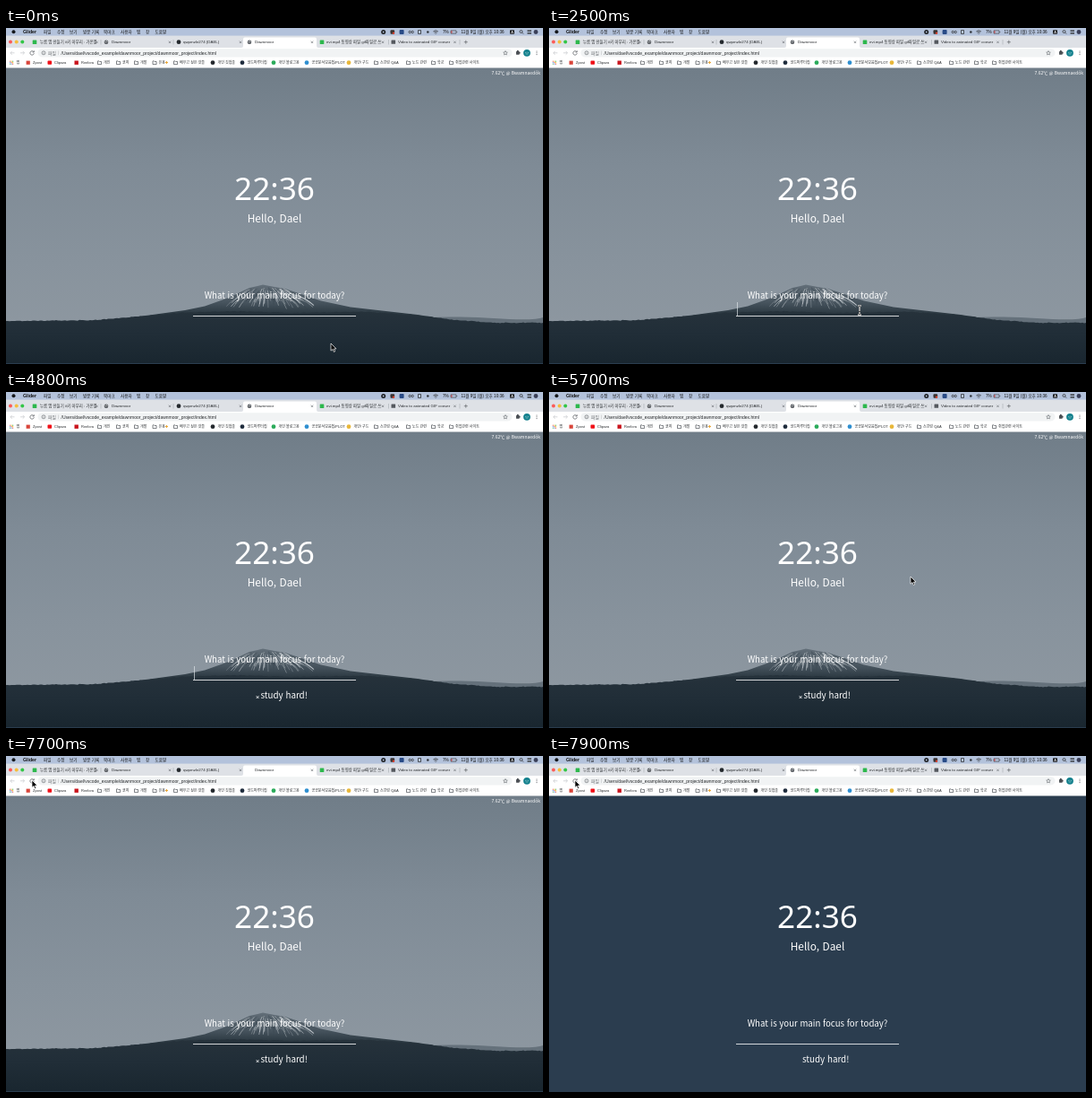
An HTML page that plays this animation: 600x375 px, repeating every 8 s.

```html
<!DOCTYPE html>
<html lang="ko">
<head>
<meta charset="utf-8">
<title>Dawnmoor</title>
<style>
html, body { margin: 0; width: 100%; height: 100%; overflow: hidden; background: #2b3d4f; }
#stage { position: relative; width: 600px; height: 375px; overflow: hidden; }
svg { position: absolute; left: 0; top: 0; }
text { white-space: pre; }
#bars { font-family: "Liberation Sans", "Noto Sans CJK KR", "Noto Sans CJK JP", sans-serif; fill: #25282b; }
#page { font-family: "Noto Sans CJK KR", "Noto Sans CJK JP", "Noto Sans", sans-serif; fill: #fff; }
#clock { font-family: "Noto Sans", sans-serif; }
.mid { text-anchor: middle; }

.scenery, #favicon, #todo, #cross, #todoText, #arrow, #beam {
  animation: 8s step-end infinite;
}
.scenery, #cross { animation-name: unload; }
#favicon { animation-name: favicon; }
#todo { animation-name: todo; }
#todoText { animation-name: nudge; }
#arrow { animation-name: arrow; }
#beam { animation-name: beam; }
#cursor { animation: move 8s linear infinite; }
#typed {
  position: absolute; left: 209.5px; top: 306px; height: 15px; width: 0;
  overflow: hidden; white-space: pre; color: #fff;
  font: 13px/15px "Liberation Sans", Arial, sans-serif;
  border-right: 1px solid transparent;
  animation: typing 8s step-end infinite, caret 8s step-end infinite;
}

@keyframes unload { 0% { opacity: 1 } 97.5%, 100% { opacity: 0 } }
@keyframes favicon { 0% { opacity: 1 } 96.25% { opacity: 0 } 97.5%, 100% { opacity: 1 } }
@keyframes todo { 0% { opacity: 0 } 60%, 100% { opacity: 1 } }
@keyframes nudge { 0% { transform: none } 97.5%, 100% { transform: translateX(-1.5px) } }
@keyframes arrow { 0% { opacity: 1 } 13.75% { opacity: 0 } 65%, 100% { opacity: 1 } }
@keyframes beam {
  0% { opacity: 0 } 13.75% { opacity: 1 } 33.75% { opacity: 0 }
  62.5% { opacity: 1 } 65%, 100% { opacity: 0 }
}
@keyframes typing {
  0% { width: 0 }
  33.75% { width: .5em }
  35% { width: .778em }
  37.5% { width: 1.334em }
  38.75% { width: 1.89em }
  41.25% { width: 2.39em }
  42.5% { width: 2.668em }
  46.25% { width: 3.224em }
  47.5% { width: 3.78em }
  50% { width: 4.113em }
  56.25% { width: 4.947em }
  60%, 100% { width: 0 }
}
@keyframes caret {
  0% { border-color: transparent }
  18.75% { border-color: #dde3e8b0 }
  25% { border-color: transparent }
  31.25% { border-color: #dde3e8b0 }
  66.25% { border-color: transparent }
  72.5% { border-color: #dde3e8b0 }
  78.75%, 100% { border-color: transparent }
}
@keyframes move {
  0% { transform: translate(363px, 352px) }
  5% { transform: translate(363px, 352px); animation-timing-function: steps(9, start) }
  16.25% { transform: translate(334px, 321px); animation-timing-function: step-end }
  17.5% { transform: translate(340px, 327px); animation-timing-function: step-end }
  18.75% { transform: translate(346px, 320px); animation-timing-function: step-end }
  20% { transform: translate(347px, 315px) }
  62.5% { transform: translate(347px, 315px); animation-timing-function: steps(8, start) }
  72.5% { transform: translate(404px, 206px); animation-timing-function: steps(5, start) }
  78.75% { transform: translate(408px, 196px) }
  83.75% { transform: translate(408px, 196px); animation-timing-function: ease-in-out }
  93.75%, 100% { transform: translate(29px, 27px) }
}
</style>
</head>
<body>
<div id="stage">
<svg width="600" height="375" viewBox="0 0 600 375">
  <defs>
    <linearGradient id="sky" x2="0" y2="1">
      <stop stop-color="#707d88"/><stop offset=".38" stop-color="#7f8b96"/>
      <stop offset=".75" stop-color="#88939d"/><stop offset="1" stop-color="#8d97a0"/>
    </linearGradient>
    <linearGradient id="rock" x2="0" y2="1">
      <stop stop-color="#626e78"/><stop offset=".5" stop-color="#46535d"/><stop offset=".8" stop-color="#2b3841"/>
    </linearGradient>
    <linearGradient id="land" x2="0" y2="1">
      <stop stop-color="#26323b"/><stop offset=".4" stop-color="#212e38"/><stop offset="1" stop-color="#19262f"/>
    </linearGradient>
  </defs>
  <g class="scenery">
    <rect y="44" width="600" height="290" fill="url(#sky)"/>
    <path d="M440 334V324Q500 321 545 324T600 323V334Z" fill="#65717b"/>
    <path d="M105 327L160 320.500L200 315L222 310.500L250 300.500L272 290L281 288L287 286.500L300 289L312 291L330 297L352 304.500L385 311.500L420 315.500L460 320L500 326.500Z" fill="url(#rock)"/>
    <g id="snow" fill="none" stroke-width=".7"></g>
    <path id="ridge" fill="url(#land)"/>
    <rect y="374" width="600" height="1" fill="#2b3d4f"/>
  </g>

  <g id="page">
    <text class="scenery" x="597" y="52" font-size="5" text-anchor="end">7.62℃ @ Bwamnaedŏk</text>
    <text id="clock" class="mid" x="300" y="192.300" font-size="35.200">22:36</text>
    <text class="mid" x="300" y="217" font-size="11.900">Hello, Dael</text>
    <text class="mid" x="300" y="301.500" font-size="9.650">What is your main focus for today?</text>
    <rect x="209" y="321" width="182" height="1" opacity=".8"/>
    <g id="todo">
      <path id="cross" d="M279.700 339.200l2.800 2.800m0-2.800l-2.800 2.800" stroke="#fff" stroke-width=".9"/>
      <text id="todoText" x="284.500" y="342" font-size="9.800">study hard!</text>
    </g>
  </g>

  <g id="bars"></g>
</svg>
<div id="typed">study hard!</div>
<svg width="600" height="375" viewBox="0 0 600 375">
  <g id="cursor">
    <path id="arrow" d="M0 0V8.200L2 6.500L3.300 9.500L4.700 8.900L3.400 6H6Z" fill="#000" stroke="#fff" stroke-width=".7"/>
    <g id="beam" fill="none">
      <defs><path id="stem" d="M-2-5Q0-5 0-4V4Q0 5-2 5M2-5Q0-5 0-4M0 4Q0 5 2 5M-1 1.500H1"/></defs>
      <use href="#stem" stroke="#fff" stroke-width="1.900"/>
      <use href="#stem" stroke="#222" stroke-width=".8"/>
    </g>
  </g>
</svg>
</div>
<script>
const $ = id => document.getElementById(id);
const text = (x, y, s, size, more = "") => `<text x="${x}" y="${y}" font-size="${size}" ${more}>${s}</text>`;
const dot = (x, y, r, fill) => `<circle cx="${x}" cy="${y}" r="${r}" fill="${fill}"/>`;
const box = (x, y, w, h, fill, r = 0) => `<rect x="${x}" y="${y}" width="${w}" height="${h}" rx="${r}" fill="${fill}"/>`;
const line = (d, color = "#5f6368", w = .7) => `<path d="${d}" fill="none" stroke="${color}" stroke-width="${w}"/>`;
const close = x => line(`M${x - 1.2} 14.6l2.4 2.4m0-2.4l-2.4 2.4`, "#5f6368", .6);
const globe = x => dot(x, 15.7, 2.3, "#4d5156") +
  line(`M${x - 2} 15l1.6.4.4 1.4M${x + .3} 13.8l.3 1.2 1.4.5`, "#dfe2e6", .6);
const folder = x => line(`M${x - 2} 36.9h1.5l.6.6h2v3.1h-4.1z`, "#5f6368", .8);

function menuBar() {
  const labels = [[42, "파일"], [57, "수정"], [71, "보기"], [86, "방문 기록"], [109, "북마크"],
    [128, "사용자"], [146, "탭"], [156, "창"], [166.5, "도움말"]];
  const label = (x, s) => text(x, 6, s, 4.6, 'fill="#111"');
  return box(0, 0, 600, 9, "#b3c2db") + dot(8.5, 4.3, 2, "#15181c") +
    text(19, 6, "Glider", 5.2, 'font-weight="bold" fill="#111"') +
    labels.map(([x, s]) => label(x, s)).join("") +
    dot(421.7, 4.5, 2.5, "#1b1d20") + dot(421.7, 4.5, .9, "#b3c2db") +
    box(429.5, 2.2, 4.6, 4.6, "#36302f", 1) + dot(433, 5.8, 1.2, "#d8412f") +
    box(439.6, 2, 5, 5, "#284a86", 1) +
    line("M450 4.5a1.2 1.2 0 1 0 2.4 0a1.2 1.2 0 1 0-2.4 0M453 4.5a1.2 1.2 0 1 0 2.4 0a1.2 1.2 0 1 0-2.4 0", "#222") +
    line("M460.5 2.5h3v4h-3z", "#222") + dot(471.3, 4.5, 1.3, "#30343a") +
    line("M477.4 3.9q2.7-2.4 5.4 0M478.5 5.1q1.6-1.3 3.2 0M479.6 6.3h1", "#222") +
    label(488, "7%") +
    line("M497 2.9h6v3.2h-6zM503.8 4v1", "#333", .6) + box(497.4, 3.2, 1, 2.6, "#c33") +
    label(508.5, "11월 9일 (월) 오후 10:36") +
    box(563, 2.2, 5, 4.6, "#1c1e22", .8) + text(564.2, 6, "A", 4, 'fill="#fff"') +
    line("M574 4a1.5 1.5 0 1 0 3 0a1.5 1.5 0 1 0-3 0M576.6 5.1l1.5 1.5", "#222") +
    line("M582.5 3.2h4.5M582.5 5.8h4.5", "#222", 1.2) + dot(592, 4.5, 2.4, "#3a3f58");
}

function tabStrip() {
  const tab = (x, s) => text(x, 17.3, s, 4.4);
  return box(0, 8.6, 600, 13.4, "#dee1e6") +
    dot(5, 15.4, 2, "#fc5b57") + dot(11.7, 15.4, 2, "#f6bd3b") + dot(18.3, 15.4, 2, "#34c648") +
    '<path d="M263 22q2 0 2-2v-7.5q0-2 2-2h78q2 0 2 2v7.5q0 2 2 2z" fill="#fff"/>' +
    line("M106 13v5.5M187 13v5.5M427.5 13v5.5M507 13v5.5", "#9aa0a6", .5) +
    box(29.7, 13.4, 4.6, 4.6, "#2db84d", .5) + tab(38, "누름 앱 만들기 #키 마무리 : 가온별") +
    globe(112) + tab(118, "Dawnmoor") +
    dot(193, 15.7, 2.4, "#24292e") + tab(198, "qwpmzle274 (DAEL)") +
    `<g id="favicon">${globe(272)}</g>` + tab(278, "Dawnmoor") +
    box(350.7, 13.4, 4.6, 4.6, "#2db84d", .5) + tab(358, "evi.mp4 동영상 파일 gif파일로 쓰") +
    box(430.5, 13.6, 4.6, 4.2, "#54585e", .5) + tab(438, "Video to animated GIF conver") +
    [101.5, 183, 262, 342, 421, 501.5].map(close).join("") +
    line("M511.8 15.7h4M513.8 13.7v4");
}

function addressBar() {
  return box(0, 22, 600, 22.5, "#fff") + box(35.5, 23.2, 530, 9.2, "#f1f3f4", 4.6) +
    line("M9.5 27.8h-4.5m1.8-1.9l-1.9 1.9l1.9 1.9M16 27.8h4.5m-1.8-1.9l1.9 1.9l-1.9 1.9", "#c4c7ca") +
    line("M30.8 26.5a2.2 2.2 0 1 0 .5 1.7M31.3 25.3v1.7h-1.7", "#5f6368", .8) +
    line("M40 27.8a2 2 0 1 0 4 0a2 2 0 1 0-4 0M42 27.5v1.3M42 26.6v.4", "#5f6368", .6) +
    text(47, 29.5, "파일", 4.8, 'fill="#5f6368"') + line("M58.5 25.5v4.6", "#b9bcc0", .5) +
    text(61.5, 29.5, "/Users/dael/vscode_example/dawnmoor_project/dawnmoor_project/index.html", 5) +
    line("M558 25.5l.7 1.5 1.6.2-1.2 1.1.3 1.6-1.4-.8-1.4.8.3-1.6-1.2-1.1 1.6-.2z", "#5f6368", .6) +
    box(570, 26, 3.6, 3.8, "#4b4f54", .6) + dot(573.7, 27.8, 1, "#4b4f54") + dot(571.8, 25.8, 1, "#4b4f54") +
    dot(582, 27.8, 3.9, "#13808d") + line("M580 27.4h1.5M582.6 27.4h1.5M580.5 29h3", "#bfe0e3", .5) +
    [26, 27.8, 29.6].map(y => dot(593, y, .55, "#5f6368")).join("");
}

function bookmarks() {
  const label = (x, s) => text(x, 40.2, s, 4);
  const folders = [[104.5, "개인"], [125.5, "코지"], [145.5, "개발"], [166, "유용"], [189.5, "배우고 싶은 것들"],
    [413.5, "스프링 Q&amp;A"], [449.5, "노드 관련"], [477.5, "학교"], [497.5, "취업관련 사이트"]];
  const sites = [[231, "개인 깃헙출", "#24292e"], [264, "코드마루터집", "#1f2c3d"], [299, "개인 블로그용", "#2cab5b"],
    [336, "공공문서모음집/PLOT", "#2f8fd0"], [383, "개인! 구드", "#e8b73a"]];
  const hues = ["#ea4335", "#fbbc05", "#34a853", "#4285f4"];
  let out = label(11.5, "앱");
  for (let i = 0; i < 9; i++) out += box(4.2 + i % 3 * 1.5, 36.7 + (i / 3 | 0) * 1.5, 1, 1, hues[i % 4]);
  out += box(22.6, 36.6, 4.2, 4.2, "#d9453a") + label(30, "Zpost") +
    box(46.5, 36.6, 4.6, 4.2, "#f00f17", .8) + label(54, "Clipoza") +
    box(76.5, 36.5, 4.4, 4.4, "#c9141d") + label(84, "Reelora");
  for (const [x, s] of folders) out += folder(x) + label(x + 4.5, s);
  for (const [x, s, c] of sites) out += dot(x, 38.7, 2.4, c) + label(x + 5.5, s);
  return out + line("M179.5 37v3M178 38.5h3", "#e9a83b", 1);
}

$("bars").innerHTML = menuBar() + tabStrip() + addressBar() + bookmarks();

let seed = 11;
const rand = () => (seed = seed * 16807 % 2147483647) / 2147483647;

// Snow and bare rock run down and outward from the summit.
let runs = "";
for (let i = 0; i < 150; i++) {
  const x = 274 + rand() * 38, drop = rand() * 13, len = 3 + rand() * 9;
  const lean = (x - 291) * .085;
  const y = 289 + Math.abs(x - 290) * .1 + drop;
  runs += `<path d="M${x + lean * drop} ${y}q${lean * len * .6} ${len * .3} ${lean * len} ${len}"
    stroke="${i % 3 ? "#dfe4e7" : "#36434d"}" opacity="${.3 + rand() * .5}"/>`;
}
$("snow").innerHTML = runs;

// A wooded skyline through a few heights, roughened by tree tops.
const skyline = [[0, 327], [100, 326], [200, 317.5], [260, 316], [320, 318], [400, 316.5],
  [460, 320.5], [500, 325.5], [545, 329], [600, 329]];
let d = "M0 375";
for (let x = 0, k = 0; x <= 600; x += 2) {
  if (x > skyline[k + 1][0]) k++;
  const [[ax, ay], [bx, by]] = [skyline[k], skyline[k + 1]];
  d += `L${x} ${(ay + (by - ay) * (x - ax) / (bx - ax) + rand() * .9 - .4).toFixed(1)}`;
}
$("ridge").setAttribute("d", d + "V375Z");
</script>
</body>
</html>
```
